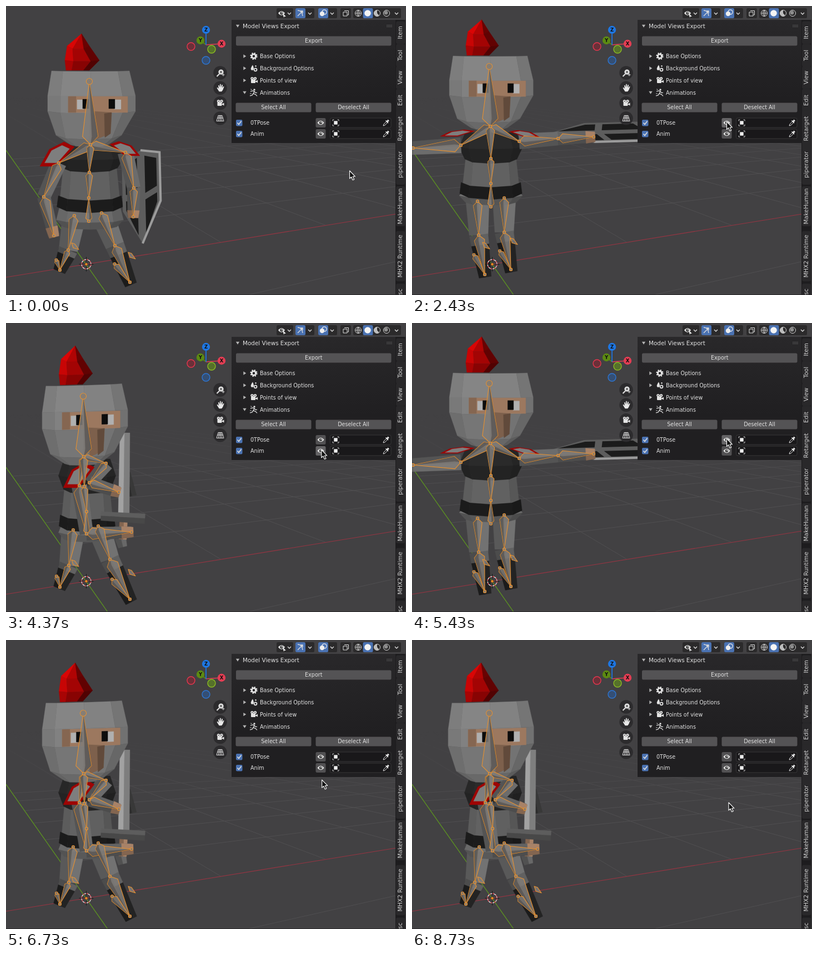
An HTML page that plays this animation: 720 px wide and 521 px high, repeating every 8.76 s.

```html
<!DOCTYPE html>
<html lang="en">
<head>
<meta charset="utf-8">
<title>Model Views Export</title>
<style>
html, body { margin: 0; width: 100%; height: 100%; overflow: hidden; background: #424143; }
svg { display: block; width: 720px; height: 521px; }
text { font: 9.6px "DejaVu Sans", sans-serif; fill: #e2e2e2; }
.big { font-size: 10.4px; }
.tab { font-size: 10.4px; fill: #d2d2d2; text-anchor: middle; }
.mid { text-anchor: middle; }
.axis { font-size: 8.5px; font-weight: bold; fill: #101010; text-anchor: middle; }
.bone { fill: rgba(128, 125, 121, .85); stroke: #e8912f; stroke-width: 1.1; stroke-linejoin: round; }
.dim { fill: rgba(70, 67, 64, .5); }
.line { fill: none; stroke: #dedede; stroke-width: 1.3; }
</style>
</head>
<body>
<svg id="stage" viewBox="0 0 720 521"></svg>
<script>
const LOOP = 8760;

// ---- solid shapes ----
const grey = v => [v, v, v];
const RED = [176, 4, 4], SKIN = [156, 120, 95], DARK = grey(32);
const tint = (rgb, k) => `rgb(${rgb.map(c => Math.min(255, Math.round(c * k)))})`;
const mix = (a, b, p) => a.map((v, i) => v + (b[i] - v) * p);
const poly = (pts, rgb, k = 1) => {
  const fill = tint(rgb, k);
  return `<polygon points="${pts.join(' ')}" fill="${fill}" stroke="${fill}" stroke-width=".4"/>`;
};

// Faceted column through rings [x, y, half width, sag], lit from left to right.
function column(rings, rgb, left = .88, right = .8, sides = 4) {
  const corner = ([x, y, w, sag = 0], i) => {
    const a = Math.PI * i / sides;
    return [x - w * Math.cos(a), y + sag * Math.sin(a)];
  };
  let out = '';
  for (let j = 1; j < rings.length; j++) {
    const [p, q] = [rings[j - 1], rings[j]];
    const slope = Math.max(-1, Math.min(1, (q[2] - p[2]) / (q[1] - p[1])));
    for (let i = 0; i < sides; i++) {
      const u = (i + .5) / sides;
      const light = (left + (right - left) * u + .15 * Math.sin(Math.PI * u)) * (1 + .18 * slope);
      out += poly([corner(p, i), corner(p, i + 1), corner(q, i + 1), corner(q, i)], rgb, light);
    }
  }
  return out;
}

// Tapered two-sided beam from a to b.
function limb(a, b, wa, wb, rgb) {
  const [dx, dy] = [b[0] - a[0], b[1] - a[1]], len = Math.hypot(dx, dy);
  const side = (p, w) => [p[0] - dy / len * w, p[1] + dx / len * w];
  const half = (from, to, k) =>
    poly([side(a, wa * from), side(b, wb * from), side(b, wb * to), side(a, wa * to)], rgb, k);
  return half(1, -.1, .84) + half(-.1, -1, 1.08);
}

function arm([shoulder, elbow, hand]) {
  return limb(shoulder, elbow, 14, 12, grey(100)) + limb(elbow, hand, 12, 10, grey(92)) +
    limb(mix(elbow, hand, .78), mix(elbow, hand, 1.04), 11, 9, SKIN);
}

function leg([hip, knee, toe]) {
  const ankle = mix(knee, toe, .25);
  return limb(ankle, mix(knee, toe, 1.07), 16, 11, DARK) +
    limb(hip, knee, 21, 17, grey(106)) + limb(knee, ankle, 17, 16, grey(90));
}

function torso({ x, top, mid, belt, hip, w }) {
  return column([[x, belt + 14, w], [x, hip, w * 1.12, 5], [x, hip + 12, w * .9, 5]], grey(106)) +
    column([[x, mid - 6, w * .88, 4], [x, belt + 4, w, 8]], grey(98)) +
    column([[x, belt - 4, w * 1.05, 9], [x, belt + 16, w * 1.1, 11]], grey(28)) +
    column([[x, top, w * .9], [x, top + (mid - top) * .55, w * 1.12, 4], [x, mid, w * .92, 8]], grey(40));
}

function pauldron([x, y, w, h]) {
  const shape = k => [[-1, 1], [-.45, -.4], [.4, -1], [1, -.6], [0, 1]].map(([u, v]) => [x + u * w * k, y + v * h * k]);
  return poly(shape(1), RED, .9) + poly(shape(.72), grey(126));
}

function shield(matrix) {
  let slots = '';
  for (const s of [-1, 1])
    slots += poly([[s * .2, .07], [s * .82, .13], [s * .82, .43], [s * .2, .47]], DARK, .85) +
      poly([[s * .2, .54], [s * .82, .5], [s * .82, .6], [s * .2, .9]], DARK, .85);
  return `<g transform="matrix(${matrix})">` +
    '<path d="M-1 .08L0 0L1 .08V.6L0 1L-1 .6z" fill="#5d5d5d"/>' + slots.replace(/stroke-width=".4"/g, 'stroke-width="0"') +
    '<path d="M0 0L1 .08V.6L0 1" fill="none" stroke="#9c9c9c" stroke-width="4" vector-effect="non-scaling-stroke"/></g>';
}

function sword() {
  const hilt = [212, 348];
  return limb([218, 270], [226, 312], 6, 9, grey(52)) + limb(hilt, [214, 198], 10, 9, grey(150)) +
    limb([206, 388], [210, 404], 10, 8, grey(96)) + limb(hilt, [210, 390], 7, 7, SKIN) +
    limb([171, 348], [250, 353], 8, 9, grey(86));
}

const plume = column([[136, 50, 0], [130, 72, 20, 6], [137, 98, 31, 2], [129, 116, 21]], RED, 1.12, .3, 3);

function face() {
  const quad = (x, y, w, h, rgb, k) => poly([[x, y], [x + w, y], [x + w, y + h], [x, y + h]], rgb, k);
  const look = (white, pupil) => quad(white, 169, 12, 17, grey(176)) + quad(pupil, 168, 11, 17, grey(12));
  return quad(112, 163, 107, 29, SKIN) + quad(112, 163, 14, 29, SKIN, .85) +
    poly([[160, 190], [190, 192], [188, 230], [163, 240]], SKIN, .8) +
    poly([[177, 194], [190, 192], [188, 230], [178, 237]], SKIN, .62) + look(128, 138) + look(195, 185);
}

const head = plume + column([
  [152, 117, 70, 1], [154, 162, 79], [154, 190, 79, 4], [149, 233, 59, 8], [150, 250, 34, 4]
], grey(130)) + face();

// ---- armature ----
function bone(a, b) {
  const [dx, dy] = [b[0] - a[0], b[1] - a[1]], len = Math.hypot(dx, dy);
  const w = Math.max(4, Math.min(14, len * .13)) / len;
  const m = mix(a, b, .13), l = [m[0] - dy * w, m[1] + dx * w], r = [m[0] + dy * w, m[1] - dx * w];
  const dot = p => `<circle class="bone" cx="${p[0]}" cy="${p[1]}" r="2.5"/>`;
  return `<path class="dim" d="M${a}L${l}L${b}z"/><path class="bone" d="M${a}L${l}L${b}L${r}z"/>` +
    `<path class="dim" d="M${a}L${mix(l, r, .4)}L${b}L${l}z"/>` + dot(a) + dot(b);
}
const chain = pts => pts.slice(1).map((p, i) => bone(pts[i], p)).join('');
const pole = ([x, y]) => `<path class="bone" d="M${x} ${y}l-3-9 6 2 7 10z"/>`;
const foot = ([, knee, toe]) => {
  const m = mix(knee, toe, .5);
  return bone([m[0] - 14, m[1]], toe);
};

function rig({ neck, crown, spine, arms, legs, poles }) {
  return arms.map(a => chain([neck, ...a])).join('') + chain([neck, spine[0], spine[1]]) + bone(spine[2], spine[1]) +
    legs.map(l => chain(l) + foot(l)).join('') + poles.map(pole).join('') + bone(neck, crown) +
    `<circle class="bone" cx="${crown[0]}" cy="${crown[1]}" r="5.5"/>`;
}

// ---- poses: joints drive both the body and the armature ----
const stancePoles = [[121, 436], [223, 453]];
const poses = {
  walk: {
    neck: [152, 250], crown: [150, 136], spine: [[150, 300], [149, 346], [149, 388]],
    arms: [[[95, 283], [68, 344], [86, 414]], [[215, 264], [230, 328], [229, 380]]],
    legs: [[[123, 378], [112, 440], [97, 476]], [[172, 373], [196, 432], [223, 498]]],
    poles: stancePoles, body: { x: 151, top: 252, mid: 292, belt: 346, hip: 386, w: 54 },
    pads: [[92, 267, 31, 22], [214, 257, -27, 13]], prop: shield([34, -10, 4, 168, 242, 260]), tilt: [1, 0, 0, 1, 0, 0]
  },
  tpose: {
    neck: [141, 217], crown: [139, 109], spine: [[142, 275], [142, 320], [142, 362]],
    arms: [[[88, 251], [2, 256], [-70, 258]], [[193, 244], [263, 239], [327, 236]]],
    legs: [[[118, 352], [120, 413], [131, 484]], [[166, 346], [166, 408], [178, 475]]],
    poles: [[130, 435], [180, 427]], body: { x: 142, top: 228, mid: 276, belt: 322, hip: 342, w: 51 },
    pads: [[82, 229, 31, 6], [202, 230, -27, 6]], prop: shield([10, 17, -184, 5, 430, 225]), tilt: [.955, 0, 0, .975, -4.4, -24]
  },
  guard: {
    neck: [140, 241], crown: [139, 132], spine: [[141, 295], [145, 340], [145, 380]],
    arms: [[[180, 253], [150, 288], [203, 305]], [[132, 293], [145, 380], [226, 377]]],
    legs: [[[121, 373], [113, 437], [97, 476]], [[166, 366], [187, 426], [223, 498]]],
    poles: stancePoles, body: { x: 146, top: 245, mid: 300, belt: 350, hip: 378, w: 46 },
    pads: [[131, 274, 28, 23]], prop: sword(), tilt: [.975, -.03, 0, 1.06, -8, -7.9]
  }
};
const knight = p => p.legs.map(leg).join('') + torso(p.body) + p.prop + p.arms.map(arm).join('') +
  p.pads.map(pauldron).join('') + `<g transform="matrix(${p.tilt})">${head}</g>` + rig(p);

// ---- viewport ----
function floor() {
  const origin = [144, 465], vx = [2080, 150], vy = [-75, 150];
  const along = (v, k) => origin.map((o, i) => (o + k * v[i]) / (1 + k));
  const ray = (p, v) => `<path d="M${p}L${v}" stroke="#504f51"/>`;
  let out = '';
  for (let i = 1; i < 9; i++) out += ray(along(vx, i * .143), vy);
  for (let i = -2; i < 7; i++) if (i) out += ray(along(vy, i * .25), vx);
  return `<g mask="url(#fade)">${out}</g>` +
    '<path d="M0 489L702 375" stroke="#973442" stroke-width="1.2"/>' +
    '<path d="M0 260L183 521" stroke="#5c9420" stroke-width="1.3"/>';
}

const box = (x, y, w, h, fill, r = 2.5, extra = '') =>
  `<rect x="${x}" y="${y}" width="${w}" height="${h}" rx="${r}" fill="${fill}" ${extra}/>`;
const disc = (x, y, r, fill, extra = '') => `<circle cx="${x}" cy="${y}" r="${r}" fill="${fill}" ${extra}/>`;
const ring = (x, y, r, c, w = 1, fill = 'none') => disc(x, y, r, fill, `stroke="${c}" stroke-width="${w}"`);
const label = (x, y, s, cls = '') => `<text x="${x}" y="${y}" class="${cls}">${s}</text>`;
const at = (x, y, body) => `<g transform="translate(${x} ${y})">${body}</g>`;
const line = (d, w = 1.3) => `<path class="line" d="${d}" style="stroke-width:${w}"/>`;
const chevron = x => line(`M${x - 3} 12l3 3 3-3`);
const fold = (x, y, open) =>
  at(x, y, `<path fill="#b5b5b5" d="${open ? 'M-3.2-2.2h6.4l-3.2 5z' : 'M-2.2-3.2v6.4l5-3.2z'}"/>`);

const eye = '<path d="M-6 0Q0-7.5 6 0Q0 7.5-6 0z" fill="#e6e6e6"/>' + disc(0, 0, 2.8, '#444') + disc(.8, -.8, 1, '#eee');
const camera = [-3, 2.5].map(x => ring(x, -3.5, 1.8, '#e4e4e4', 1.8)).join('') + box(-5, -1.5, 8, 6.5, '#e4e4e4', 1) +
  '<path d="M3 1.5l4-2v5l-4-2z" fill="#e4e4e4"/>';
const gear = ring(0, 0, 3.6, '#e6e6e6', 2.8) +
  disc(0, 0, 5.5, 'none', 'stroke="#e6e6e6" stroke-width="2.2" stroke-dasharray="2.3 2.02"');
const drops = '<path d="M-2-6Q-7 1-4.5 3Q-1 5 0 1Q0-2-2-6z" fill="#e4e4e4"/>' + ring(3, 2.5, 2.5, '#e4e4e4', 1.8) +
  disc(3.5, -4, 1.2, '#e4e4e4');
const runner = disc(1, -5, 1.7, '#e4e4e4') + line('M-6-2l4-1 3 1 2 2.5h3M1-2l-2 4 4 1.5 3 3M-1 2l-2 3-4 1') +
  line('M-6-6l3 1M-7 2h3', .8);
const hand = '<path d="M-6 0l1.5-1 2 2.5-1-6 1.5-.5 1.5 4V-7h1.6l.4 6 1.5-5 1.5.4-.7 5.6 2-3 1.3.7-2.5 6.3-2 2.5h-4.5z" fill="#e8e8e8"/>';
const dropper = line('M-5.5 5.5l1-3 4.5-4.5 2 2-4.5 4.5z', 1) +
  '<path d="M-1.5-3.5l1-1 1.5 1 2-2.5 2.5 2.5-2.5 2 1 1.5-1 1z" fill="#e4e4e4"/>';
const frame = box(-3.2, -3.2, 6.4, 6.4, '#eee', 0) +
  line('M-5.5-3v-2.5h2.5M5.5-3v-2.5h-2.5M-5.5 3v2.5h2.5M5.5 3v2.5h-2.5', .9);

function header() {
  const slot = (x, w) => box(x, 4, w, 18, '#2b2a2b');
  const active = x => box(x, 4, 18, 18, '#4a72b2');
  const globe = x => ring(x, 13, 5.6, '#cfcfcf');
  return slot(487, 30) + at(496, 13, eye) + '<path d="M498 13l6 6h-3l-1 2z" fill="#eee"/>' + chevron(510) +
    slot(521, 34) + active(521) + line('M525 8q8 0 9 10M525 18l9-9m-4 0h4v4') + chevron(547) +
    slot(562, 34) + active(562) + ring(573, 11, 4.2, '#eee', 1.2) + disc(569, 14, 4.2, '#eee') + chevron(587) +
    slot(602, 19) + line('M607 11h7v7h-7zM609 8.5h7.5v7.5h-2', 1) +
    slot(625, 86) + active(642.5) + globe(634) +
    line('M628.5 13h11M634 7.5v11M634 7.5q-5 5.5 0 11M634 7.5q5 5.5 0 11', .8) + disc(651, 13, 5.8, '#f4f4f4') +
    globe(668) + '<path d="M668 13V7.5a5.5 5.5 0 0 0-5.5 5.5a5.5 5.5 0 0 0 9 4z" fill="#bdbdbd"/>' +
    globe(685) + disc(684, 12, 3.4, '#8d8d8d') + chevron(703);
}

function gizmo() {
  const spoke = (x, y, c, s) => `<path d="M360 70L${x} ${y}" stroke="${c}" stroke-width="1.7"/>` +
    disc(x, y, 7.2, c) + label(x, y + 3.2, s, 'axis');
  return ring(333, 73, 7, '#e8364e', 1.4, '#6b3039') + ring(360, 98, 7, '#2d77d5', 1.4, '#344f75') +
    spoke(350, 62, '#5c8a12', 'Y') + spoke(388, 68, '#e33d53', 'X') + spoke(360, 43, '#1e76e2', 'Z') +
    ring(370, 78, 7, '#8cbb24', 1.4, '#56712a');
}

function navButtons() {
  const zoom = ring(1.5, -1.5, 3.4, '#e8e8e8', 2.4, '#777') + line('M-1.5 2l-4.5 4.5', 2.2) + line('M5.5 1v5M3 3.5h5', 1);
  const grid = line('M-3.5-5h7l3 10h-13zM-5-.5h10M0-5v10M-1.7-5l-1.5 10M1.7-5l1.5 10', 1);
  return [zoom, hand, camera, grid].map((icon, i) =>
    at(385.5, 120.5 + i * 27.3, disc(0, 0, 12.2, '#2c2b2d') + icon)).join('');
}

function panel() {
  const sections = [['Base Options', gear], ['Background Options', drops], ['Points of view', camera], ['Animations', runner]];
  const button = (x, y, w, s) => box(x, y, w, 17, '#545355') + label(x + w / 2, y + 11.6, s, 'mid');
  let out = box(406, 25, 295, 222, 'url(#panel)', 0) + fold(417, 36, true) + label(426, 39.7, 'Model Views Export', 'big');
  for (let i = 0; i < 8; i++) out += box(685.5 + i % 4 * 2.6, 34 + (i >> 2) * 2.8, 1.2, 1.2, '#777', 0);
  out += button(414, 54.5, 279.5, 'Export');
  sections.forEach(([name, icon], i) => {
    const y = 90.5 + i * 21.8;
    out += fold(429.5, y, i === 3) + at(446, y, icon) + label(457, y + 3.6, name);
  });
  out += button(413.5, 174.5, 136, 'Select All') + button(557.5, 174.5, 136, 'Deselect All');
  ['0TPose', 'Anim'].forEach((name, i) => {
    out += at(0, 210.5 + i * 20, box(414, -5.5, 11.5, 11.5, '#4a72b2', 2) + line('M416.5 0l2.5 3 4.5-6', 1.6) +
      label(440, 3.3, name) + box(557.5, -8.5, 18, 17, '#525153', 2.5, `id="eye${i}"`) + at(566.5, 0, eye) +
      box(583.5, -8.5, 109.5, 17, '#19181a', 2.5, 'stroke="#3b3a3c" stroke-width=".9"') +
      at(593.5, 0, frame) + at(684.5, 0, dropper));
  });
  return out;
}

function tabs() {
  const list = [['Item', 48], ['Tool', 89], ['View', 129], ['Edit', 170], ['Retarget', 221],
    ['piperator', 286], ['MakeHuman', 361], ['MHX2 Runtime', 451], ['Misc', 521]];
  return box(701, 25, 19, 496, '#1d1c1e', 0) + list.map(([s, y]) => {
    const h = 16 + s.length * 6.2;
    return box(702, y - h / 2, 16, h, '#29282a', 3) +
      `<text class="tab" transform="translate(713 ${y}) rotate(-90)">${s}</text>`;
  }).join('') + box(718.5, 25, 1.5, 496, '#3b3a3c', 0);
}

const cursor3d = at(144.5, 465.5, ring(0, 0, 8.5, '#eee', 1.3) +
  disc(0, 0, 8.5, 'none', 'stroke="#d3303c" stroke-width="1.3" stroke-dasharray="3.34"') +
  '<path d="M-13 0h8M5 0h8M0-13v8M0 5v8" stroke="#161616"/>' + ring(0, 0, 2.6, '#222', .6, '#f08a24'));

const ramp = (id, y1, y2, from, to) =>
  `<linearGradient id="${id}" x1="0" y1="${y1}" x2="0" y2="${y2}" gradientUnits="userSpaceOnUse">` +
  `<stop stop-color="${from}"/><stop offset="1" stop-color="${to}"/></linearGradient>`;
const defs = `<defs>${ramp('far', 165, 300, '#000', '#fff')}${ramp('panel', 25, 167, '#29282a', '#201f21')}
  <mask id="fade" maskUnits="userSpaceOnUse" x="0" y="0" width="720" height="521">
  <rect width="720" height="521" fill="url(#far)"/></mask></defs>`;

document.getElementById('stage').innerHTML = defs + box(0, 0, 720, 521, '#424143', 0) + floor() +
  Object.keys(poses).map(id => `<g id="${id}">${knight(poses[id])}</g>`).join('') +
  cursor3d + gizmo() + navButtons() + header() + panel() + tabs() + box(0, 520, 720, 1, '#2a292b', 0) +
  '<path id="pointer" d="M0 0V14L3.2 11.2L5.6 16.8L8.2 15.7L5.8 10.3H10z" fill="#111" stroke="#fff" stroke-width="1.1" stroke-linejoin="round"/>';

// ---- motion: the pointer visits the eye buttons and clicks each one ----
const TRAVEL = 600, CLICK = 230;
const tposeEye = [566.5, 208.5], animEye = [568, 232];
const visits = [
  { time: 0, spot: [618.5, 297], pose: 'walk' },
  { time: 960, spot: animEye, pose: 'guard' },
  { time: 2130, spot: tposeEye, pose: 'tpose' },
  { time: 3080, spot: animEye, pose: 'guard' },
  { time: 4830, spot: tposeEye, pose: 'tpose' },
  { time: 6200, spot: animEye, pose: 'guard' },
  { time: 7100, spot: [570, 293], pose: 'guard' }
];

function pointerAt(t) {
  const next = visits.findIndex(v => v.time > t);
  if (next < 0) return visits[visits.length - 1].spot;
  const p = Math.max(0, 1 - (visits[next].time - t) / TRAVEL);
  return mix(visits[next - 1].spot, visits[next].spot, p * p * (3 - 2 * p));
}

const byId = id => document.getElementById(id);

function draw(t) {
  const { pose } = visits.filter(v => v.time + CLICK <= t).pop() || visits[0];
  for (const id in poses) byId(id).style.display = id === pose ? '' : 'none';
  const [x, y] = pointerAt(t);
  byId('pointer').setAttribute('transform', `translate(${x} ${y})`);
  for (const i of [0, 1]) {
    const over = Math.abs(x - 566.5) < 9 && Math.abs(y - 210.5 - i * 20) < 9;
    byId('eye' + i).setAttribute('fill', over ? '#656466' : '#525153');
  }
}

const start = performance.now();
function tick() {
  draw((performance.now() - start) % LOOP);
  requestAnimationFrame(tick);
}
tick();
</script>
</body>
</html>
```
